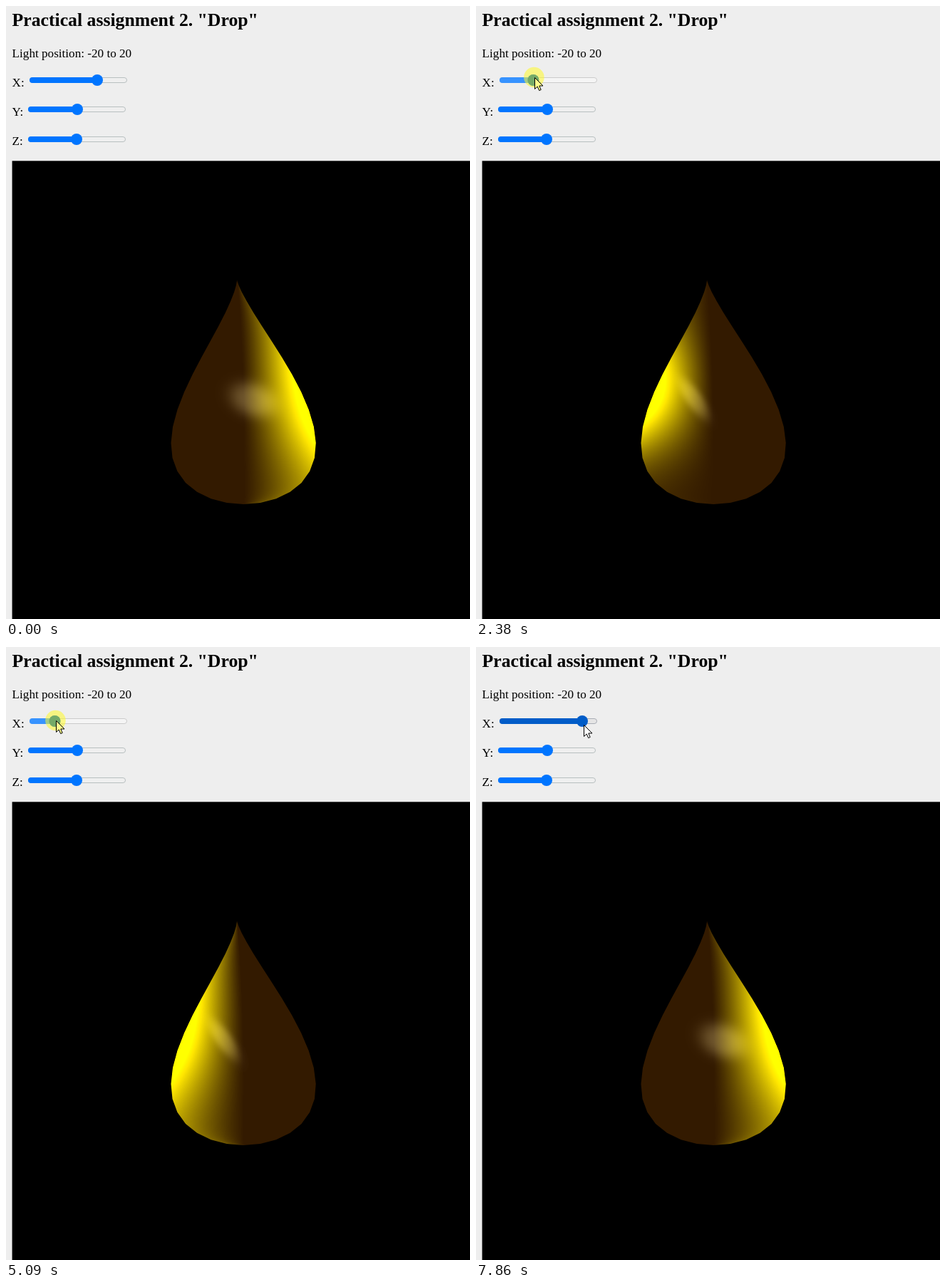
An HTML page with a canvas for the animation above (8000 ms loop, 651 by 860 pixels).

```html
<!DOCTYPE html>
<html lang="en">
<head>
<meta charset="utf-8">
<title>Drop</title>
<style>
html, body { margin: 0; width: 100%; height: 100%; overflow: hidden; background: #eee; }
canvas, svg { position: absolute; left: 0; top: 0; display: block; }
text { font: 17.15px "Liberation Serif", "Times New Roman", serif; fill: #000; }
text.title { font-weight: bold; font-size: 25.72px; }
</style>
</head>
<body>
<canvas id="scene" width="651" height="860"></canvas>
<svg id="ui" width="651" height="860" viewBox="0 0 651 860">
  <text class="title" x="8.6" y="28">Practical assignment 2. "Drop"</text>
  <text x="8.6" y="72">Light position: -20 to 20</text>
  <text x="8.6" y="113">X:</text>
  <text x="8.6" y="154">Y:</text>
  <text x="8.6" y="195">Z:</text>
</svg>
<script>
const LOOP = 8000, STEP = 80, PRESS = 1080, RELEASE = 5800;
const W = 651, H = 860;

const clamp = v => Math.min(1, Math.max(0, v));
const bell = (v, mid, width) => Math.exp(-(((v - mid) / width) ** 2));

// pointer moves: start, end, x, y reached
const moves = [
  [70, 810, 150, 112], [880, 1360, 102, 100], [1630, 2120, 86, 100],
  [2380, 2720, 68, 100], [2920, 3260, 50, 100], [3460, 3660, 43, 100],
  [3920, 3920, 35, 103], [4400, 5160, 74, 103], [5230, 5360, 84, 103],
  [5620, 6030, 115, 108], [6360, 6780, 136, 116], [7060, 7130, 143, 116],
  [7330, 7860, 151, 109]
];

function pointer(t) {
  let x = 592, y = 892;
  for (const [start, end, toX, toY] of moves) {
    if (t < start) break;
    const gaps = Math.round((end - start) / STEP);
    const done = t >= end ? 1 : (Math.floor((t - start) / (end - start) * gaps) + 1) / (gaps + 1);
    x += (toX - x) * done;
    y += (toY - y) * done;
  }
  return [x, y];
}

// teardrop of revolution, u runs from tip (0) to bottom (1)
const TOP = 384, TALL = 315;
const axis = u => 324 + 9.3 * (1 - (1 - u) ** 3);
const radius = u => 302 * u ** 1.38 * Math.sqrt(1 - u);

function outline(segments) {
  const path = new Path2D();
  for (let i = 0; i < 2 * segments; i++) {
    const u = (1 - Math.cos(Math.PI * i / segments)) / 2;
    const side = i < segments ? 1 : -1;
    path.lineTo(axis(u) + side * radius(u), TOP + TALL * u);
  }
  path.closePath();
  return path;
}
const drop = outline(20);

// yellow light from one side, strongest at height `mid`, plus a soft glint
function lightLayer(side, peak, mid, width, glint) {
  const layer = document.createElement("canvas");
  layer.width = W;
  layer.height = H;
  const c = layer.getContext("2d");
  const x0 = 225, w = 216;
  const img = c.createImageData(w, TALL + 1);
  for (let j = 0; j <= TALL; j++) {
    const u = j / TALL, gain = peak * bell(u, mid, width);
    for (let i = 0; i < w; i++) {
      const s = clamp(side * (x0 + i - axis(u)) / (radius(u) + 1));
      const dy = TOP + j - glint.y;
      const dx = x0 + i - glint.x - glint.tilt * dy;
      const d = (dx / glint.rx) ** 2 + (dy / glint.ry) ** 2;
      const shine = glint.power * Math.exp(-(d ** 1.5));
      const k = 255 * gain * s ** 1.2 + shine;
      img.data.set([k, k, shine * .75, 255], (j * w + i) * 4);
    }
  }
  c.putImageData(img, x0, TOP);
  return layer;
}

const rightGlint = { x: 346, y: 552, rx: 31, ry: 25, tilt: .3, power: 62 };
const leftGlint = { x: 306, y: 551, rx: 14, ry: 27, tilt: .55, power: 52 };
const rightLight = lightLayer(1, 1.1, .58, .36, rightGlint);
const leftLight = lightLayer(-1, 1.15, .56, .4, leftGlint);
const nearLight = lightLayer(-1, 1.13, .52, .25, leftGlint);

const ctx = document.getElementById("scene").getContext("2d");

function drawScene(pos) {
  const right = clamp((pos - 88) / 9);
  const left = clamp((94 - pos) / 9);
  const near = clamp((pos - 66) / 13);
  ctx.clearRect(0, 0, W, H);
  ctx.fillStyle = "#000";
  ctx.fillRect(8.6, 217.3, W, H);
  ctx.fillStyle = "#331a00";
  ctx.fill(drop);
  ctx.save();
  ctx.clip(drop);
  ctx.globalCompositeOperation = "lighter";
  for (const [layer, amount] of [[rightLight, right], [leftLight, left * (1 - near)], [nearLight, left * near]]) {
    ctx.globalAlpha = amount;
    ctx.drawImage(layer, 0, 0);
  }
  ctx.restore();
}

const ui = document.getElementById("ui");

function set(el, attrs) {
  for (const k in attrs) el.setAttribute(k, attrs[k]);
  return el;
}
function add(tag, attrs) {
  return ui.appendChild(set(document.createElementNS("http://www.w3.org/2000/svg", tag), attrs));
}

const looks = {
  idle: ["#0075ff", "#efefef", "#b8bfc0"],
  hover: ["#005cc8", "#e5e5e5", "#a9adb5"],
  active: ["#3793ff", "#f5f5f5", "#cbcbcb"]
};

function slider(x, y) {
  const track = add("rect", { x: x + .5, y: y - 3.5, width: 136, height: 7, rx: 3.5 });
  const bar = add("rect", { x, y: y - 4, height: 8, rx: 4 });
  const thumb = add("circle", { cy: y, r: 8 });
  return (pos, look) => {
    const [blue, fill, stroke] = looks[look];
    set(track, { fill, stroke });
    set(bar, { width: pos - x, fill: blue });
    set(thumb, { cx: pos, fill: blue });
  };
}

const sliderX = slider(33, 104);
slider(31, 145)(100, "idle");
slider(31, 187)(99, "idle");
const halo = add("circle", { r: 14.3, fill: "#fffa28", "fill-opacity": .55 });
const heldThumb = add("circle", { cy: 104, r: 8, fill: "#74aa68" });
const cursor = add("path", {
  d: "M.5 .5V16.5L4.2 13L6.7 18.6L9.2 17.5L6.8 12H12Z", stroke: "#000"
});

function drawUi(t, pos, x, y) {
  const held = t >= PRESS && t < RELEASE;
  const visibility = held ? "visible" : "hidden";
  sliderX(pos, held ? "active" : t >= 880 ? "hover" : "idle");
  set(halo, { cx: x - 1, cy: y, visibility });
  set(heldThumb, { cx: pos, visibility });
  set(cursor, {
    transform: `translate(${Math.round(x)} ${Math.round(y)})`,
    fill: held ? "#ffff8c" : "#fff"
  });
}

const begin = performance.now();
function frame() {
  const t = (performance.now() - begin) % LOOP;
  const [x, y] = pointer(t);
  const pos = t < PRESS ? 128 : Math.max(41, x - 2);
  drawScene(pos);
  drawUi(t, pos, x, y);
  requestAnimationFrame(frame);
}
frame();
</script>
</body>
</html>
```
